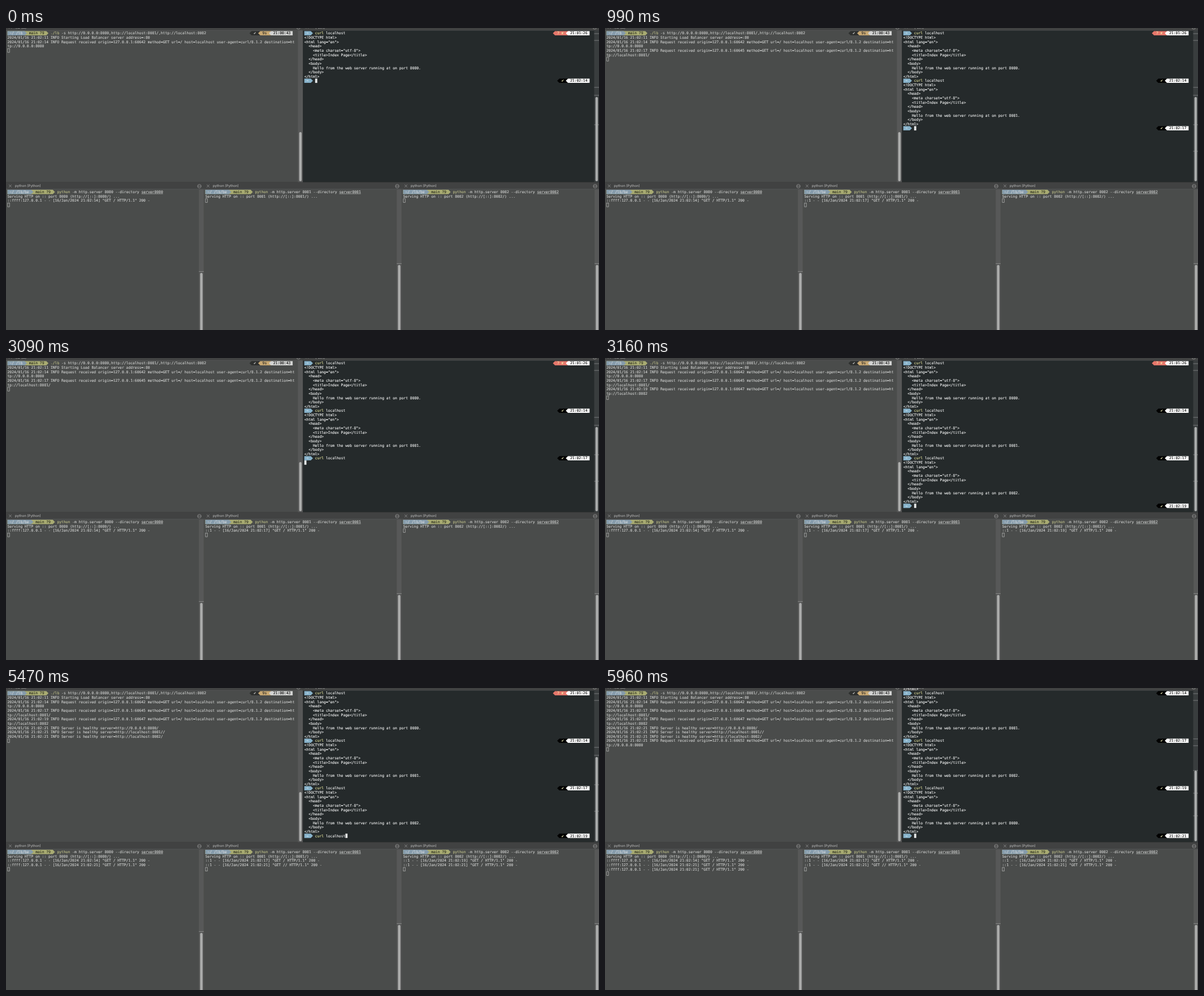
Write an HTML page that moves like this. It is 1049 by 534 pixels and loops after 8 s.

```html
<!DOCTYPE html>
<html lang="en">
<head>
<meta charset="utf-8">
<title>Load balancer demo</title>
<style>
  html, body { margin: 0; width: 100%; height: 100%; overflow: hidden; background: #4a4c4b; }
  svg { display: block; width: 1049px; height: 534px; }
  text { white-space: pre; text-rendering: geometricPrecision; }
  .mono { font: 6.35px "DejaVu Sans Mono", monospace; stroke-width: .12px; }
  .title { font: 6px Inter, sans-serif; }
</style>
</head>
<body>
<svg id="stage" viewBox="0 0 1049 534"></svg>
<script>
const COL = 3.823, ROW = 7.64, COLS = 133, LOOP = 8000;
const STEPS = [0, 500, 920, 990, 2670, 3090, 3160, 5400, 5470, 5890, 5960];
const DIM = {
  bg: '#4a4c4b', head: '#414242', track: '#575858', thumb: '#acadac', tick: '#868786',
  text: '#cfd0cf', cmd: '#bfc08a', path: '#869cac', dark: '#2d2f2e', time: '#d2d3d2'
};
const LIT = {
  bg: '#252a2b', head: '#414242', track: '#393d3e', thumb: '#a9abab', tick: '#77797a',
  text: '#f6f7f7', cmd: '#e8e79c', path: '#87b2ca', dark: '#000', time: '#fff'
};
const stage = document.getElementById('stage');

const esc = s => s.replace(/&/g, '&amp;').replace(/</g, '&lt;');
const rect = (x, y, w, h, fill, more = '') =>
  `<rect x="${x}" y="${y}" width="${w}" height="${h}" fill="${fill}" ${more}/>`;
const line = (d, color, w = 0.7) =>
  `<path d="${d}" stroke="${color}" stroke-width="${w}" fill="none"/>`;

// Terminal grid with its origin at the top left cell.
function grid(x0, y0, c) {
  const px = col => x0 + col * COL, py = row => y0 + row * ROW;
  const text = (col, row, s, fill = c.text) =>
    `<text class="mono" x="${px(col)}" y="${py(row) + 6}" fill="${fill}" stroke="${fill}">${esc(s)}</text>`;
  const lines = (rows, from = 0) => rows.map((s, i) => text(0, from + i, s)).join('');
  // Coloured prompt segment; the tip takes one extra cell on the side given by dir.
  const segment = (a, b, row, fill, dir) => {
    const [base, edge] = dir > 0 ? [px(a), px(b)] : [px(b), px(a)];
    const y = py(row), tip = edge + dir * COL;
    return `<path d="M${base} ${y}H${edge}L${tip} ${y + ROW / 2}L${edge} ${y + ROW}H${base}z" fill="${fill}"/>`;
  };
  const clock = (row, time) => segment(122, 132, row, c.time, -1) + text(123, row, time, '#111');
  const block = (col, row) => rect(px(col), py(row), COL, ROW, '#e4e6e6');
  const box = row => rect(px(0) + 0.4, py(row) + 0.5, 3.3, 6.6, 'none', `stroke="${c.text}" stroke-width=".6"`);
  return { px, py, text, lines, segment, clock, block, box };
}

function pane(x, y, w, h, title, c, thumbTop, thumbEnd, ticks) {
  const r = x + w, mid = y + 6, ix = r - 7.7, iy = mid + 0.4;
  return rect(x, y, w, h, c.bg) + rect(x, y, w, 11.5, c.head) +
    line(`M${x} ${y + 11.6}H${r}`, '#5c5d5d', 0.6) +
    line(`M${x + 5.2} ${mid - 2.3}l4.6 4.6m0 -4.6l-4.6 4.6`, '#a2a2a2') +
    `<text class="title" x="${x + 16}" y="${mid + 2.1}" fill="#c6c6c6">${title}</text>` +
    `<circle cx="${ix}" cy="${iy}" r="3.2" fill="none" stroke="#a2a2a2" stroke-width=".7"/>` +
    line(`M${ix - 3} ${iy}h6`, '#a2a2a2') +
    rect(r - 8.6, y + 12, 8.6, h - 12, c.track) +
    line(ticks.map(t => `M${r - 8.6} ${t}h8.6`).join(''), c.tick, 1) +
    rect(r - 6.4, thumbTop, 4.4, thumbEnd - thumbTop, c.thumb, 'rx="2.2"');
}

function leftPrompt(g, path, command, arg = '') {
  const end = path.length + 2, c = DIM, cmd = end + 12;
  const [name, ...rest] = command.split(' ');
  const argCol = cmd + command.length + 1, y = g.py(0) + 7;
  return g.segment(0, end + 10, 0, '#a8ab72', 1) + g.segment(0, end, 0, c.path, 1) +
    g.text(1, 0, path, '#d6dadc') + g.text(end + 2, 0, 'main ?9', '#292b1c') +
    g.text(cmd, 0, name, c.cmd) + g.text(cmd + name.length + 1, 0, rest.join(' ')) +
    (arg && g.text(argCol, 0, arg) +
      line(`M${g.px(argCol)} ${y}H${g.px(argCol + arg.length)}`, c.text, 0.6));
}

function balancer(step) {
  const g = grid(2.5, 5.4, DIM);
  const request = (sec, port, to) =>
    `2024/01/16 21:02:${sec} INFO Request received origin=127.0.0.1:${port} method=GET url=/ ` +
    `host=localhost user-agent=curl/8.1.2 destination=http://${to}`;
  const healthy = to => `2024/01/16 21:02:21 INFO Server is healthy server=http://${to}/`;
  const log = [
    [0, '2024/01/16 21:02:11 INFO Starting Load Balancer server address=:80'],
    [0, request(14, 60642, '0.0.0.0:8080')],
    [3, request(17, 60645, 'localhost:8081/')],
    [6, request(19, 60647, 'localhost:8082')],
    [7, healthy('0.0.0.0:8080')],
    [7, healthy('localhost:8081/')],
    [8, healthy('localhost:8082')],
    [10, request(21, 60652, '0.0.0.0:8080')]
  ];
  const rows = log.filter(([from]) => step >= from)
    .flatMap(([, s]) => s.length > COLS ? [s.slice(0, COLS), s.slice(COLS)] : [s]);
  return pane(0, -7.5, 525, 280, './lb (lb)', DIM, 184, 271, []) +
    leftPrompt(g, '~/ /lb', './lb -s http://0.0.0.0:8080,http://localhost:8081/,http://localhost:8082') +
    g.segment(113, 118, 0, DIM.dark, -1) + g.text(114, 0, '✔') +
    g.segment(117, 122, 0, '#c8a872', -1) + g.text(118, 0, '9s', '#222') +
    g.clock(0, '21:00:43') + g.lines(rows, 1) + g.box(rows.length + 1);
}

function client(step) {
  const c = LIT, g = grid(527.7, 5.4, c);
  const done = 1 + (step >= 3) + (step >= 6) + (step >= 10);
  const typed = [1, 4, 7, 8].includes(step), running = [2, 5, 9].includes(step);
  const scroll = step === 10 ? 11 : step === 9 ? 1 : 0;
  const thumbTop = step === 10 ? 146 : step === 9 ? 125 : 122;
  const times = ['21:01:26', '21:02:14', '21:02:17', '21:02:19', '21:02:21'];
  const page = port => ['<!DOCTYPE html>', '<html lang="en">', '  <head>', '    <meta charset="utf-8">',
    '    <title>Index Page</title>', '  </head>', '  <body>',
    `    Hello from the web server running at on port ${port}.`, '  </body>', '</html>'];
  const ticks = [10, 22, ...(step === 10 ? [90, 102, 146, 186, 226] : [105, 119, 171])];
  if (step >= 3 && step < 10) ticks.push(218);
  let out = pane(525.3, -7.5, 523.8, 280, '~ (-zsh)', c, thumbTop, 271, ticks);
  for (let i = 0; i <= done; i++) {
    const row = i * 11 - scroll;
    if (row >= 0) {
      out += g.segment(0, 3, row, c.path, 1) + g.text(1, row, '~', '#fff');
      out += i ? g.segment(118, 123, row, c.dark, -1) + g.text(119, row, '✔', '#f3f2bd')
               : g.segment(116, 123, row, '#e5776b', -1) + g.text(117, row, '7 ✘', '#f7dfa6');
      out += g.clock(row, times[i]);
      if (i < done || typed || running) out += g.text(5, row, 'curl', c.cmd) + g.text(10, row, 'localhost');
    }
    if (i < done) out += g.lines(page(8080 + i % 3), row + 1);
  }
  const last = done * 11 - scroll;
  return out + (running ? g.block(0, last + 1) : g.block(typed ? 19 : 5, last));
}

function server(i, step) {
  const x = i * 350, port = 8080 + i, g = grid(x + 2.5, 286.1, DIM);
  const hit = (sec, url = '/') =>
    `${i ? '::1' : '::ffff:127.0.0.1'} - - [16/Jan/2024 21:02:${sec}] "GET ${url} HTTP/1.1" 200 -`;
  const rows = [`Serving HTTP on :: port ${port} (http://[::]:${port}/) ...`];
  if (step >= i * 3) rows.push(hit([14, 17, 19][i]));
  if (step >= 8) rows.push(hit(21, i === 1 ? '//' : '/'));
  if (step >= 10 && !i) rows.push(hit(21));
  const top = i ? 419 : 433;
  return pane(x, 273.3, 349.8, 261, 'python (Python)', DIM, top, 540, [top - 2.5]) +
    leftPrompt(g, '~/ /lb/be', `python -m http.server ${port} --directory`, `server${port}`) +
    g.lines(rows, 1) + g.box(rows.length + 1);
}

let shown = -1;
function frame() {
  const t = performance.now() % LOOP;
  const step = STEPS.filter(s => s <= t).length - 1;
  if (step !== shown) {
    shown = step;
    stage.innerHTML = rect(0, 0, 1049, 534, '#363737') + balancer(step) + client(step) +
      [0, 1, 2].map(i => server(i, step)).join('');
  }
  requestAnimationFrame(frame);
}
frame();
</script>
</body>
</html>
```
